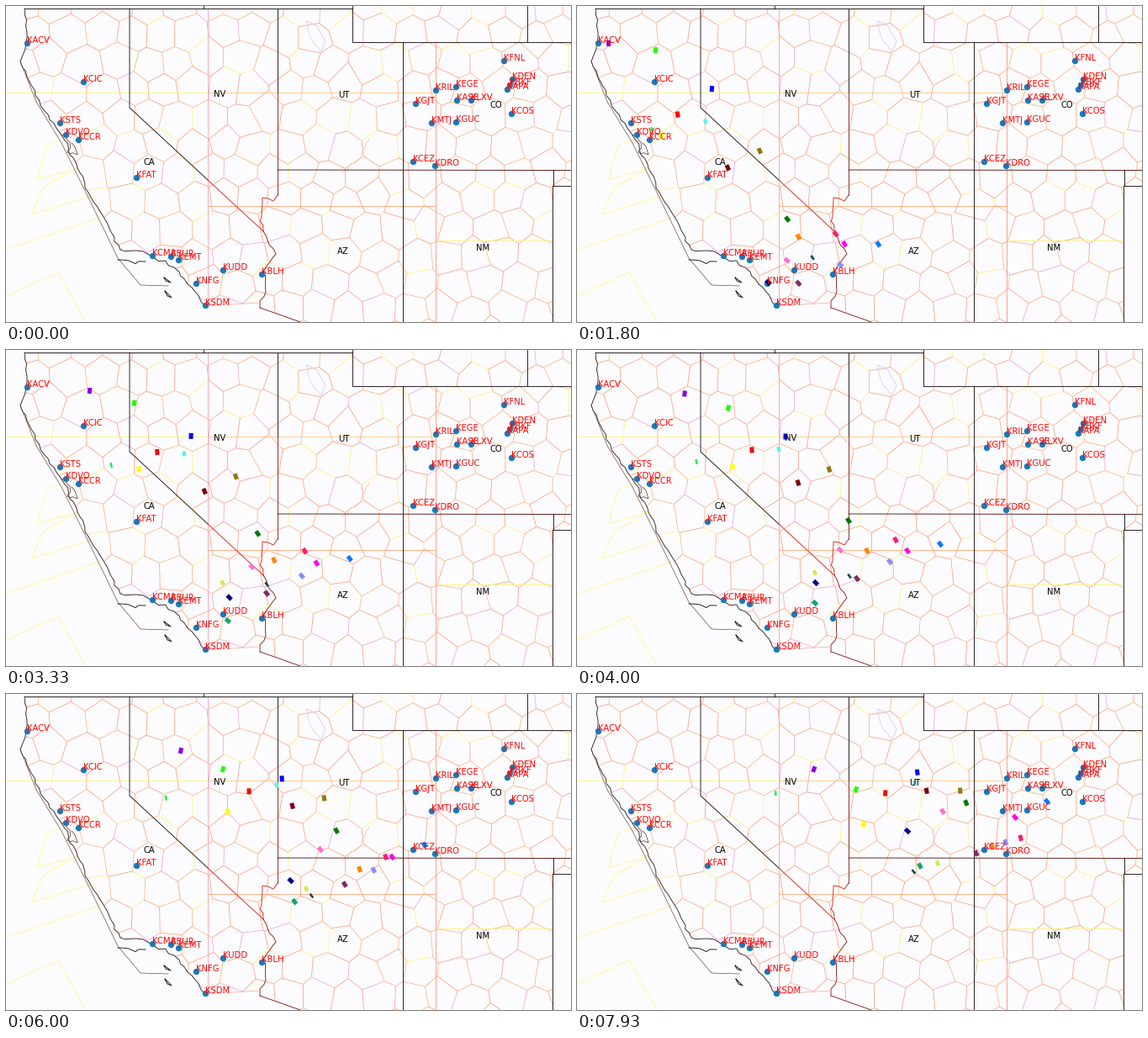
A matplotlib script for the animation above (8 s loop, 672 by 376 pixels).

```python
import matplotlib.pyplot as plt
import numpy as np
from matplotlib.animation import FuncAnimation
from matplotlib.collections import LineCollection
from matplotlib.patches import Polygon

W, H, DPI = 672, 376, 100
FRAMES, INTERVAL = 160, 50
PX = 72 / DPI
MIDWAY, LATE = 4.0, 7.93

fig = plt.figure(figsize=(W / DPI, H / DPI), dpi=DPI, facecolor="#fcfcfe")
ax = fig.add_axes([0, 0, 1, 1])
ax.set(xlim=(0, W), ylim=(H, 0))
ax.axis("off")
rng = np.random.default_rng(11)


def line(points, color="#181010", width=0.9):
    x, y = zip(*points)
    ax.plot(x, y, color=color, lw=width * PX, zorder=1.5)


def rugged(points, step=6, rough=1.1):
    """Subdivide a polyline and shake the new points a little."""
    out = [points[0]]
    for a, b in zip(np.array(points[:-1], float), np.array(points[1:], float)):
        n = max(1, int(np.hypot(*(b - a)) / step))
        out += [a + (b - a) * k / n + rng.normal(0, rough, 2) for k in range(1, n)]
        out.append(b)
    return out


def hex_sites(dx=37, dy=33, jitter=8):
    return np.array([(x + dx / 2 * (row % 2), y) + rng.uniform(-jitter, jitter, 2)
                     for row, y in enumerate(range(-dy, H + 2 * dy, dy))
                     for x in range(-dx, W + 2 * dx, dx)])


def voronoi_edges(sites, reach=85):
    edges = []
    for i, a in enumerate(sites):
        near = np.hypot(*(sites - a).T) < 2 * reach
        for j in range(i + 1, len(sites)):
            b = sites[j]
            if np.hypot(*(b - a)) > reach:
                continue
            keep = near.copy()
            keep[[i, j]] = False
            others = sites[keep] - a
            mid = (b - a) / 2
            along = np.array([-mid[1], mid[0]])
            slope = others @ along
            s = ((others**2).sum(1) / 2 - others @ mid) / slope
            lo, hi = max(s[slope < 0], default=-3), min(s[slope > 0], default=3)
            if lo < hi:
                edges.append([a + mid + lo * along, a + mid + hi * along])
    return edges


COAST = rugged([(22, 3), (25, 38), (17, 66), (28, 90), (46, 125), (70, 160), (85, 193),
                (104, 233), (122, 262), (136, 290), (155, 291), (175, 299), (200, 311),
                (225, 340), (237, 357)])
LAND = [*COAST, (302, 353), (304, 359), (350, 376), (650, 376), (650, 214),
        (672, 214), (672, 0), (412, 0), (412, 3)]

# Weather cells
edges = voronoi_edges(hex_sites())
tints = rng.choice(["#ff9a78", "#ffb07c", "#f0a0dc", "#fff07a"], len(edges),
                   p=[0.5, 0.3, 0.08, 0.12])
cells = LineCollection(edges, colors=tints, linewidths=0.75 * PX, zorder=1)
ax.add_collection(cells)
cells.set_clip_path(Polygon(LAND, transform=ax.transData))

# Tile seams
line([(0, 103), (240, 103)], "#fff27c")
line([(240, 103), (511, 103)], "#ffc78c")
line([(240, 238), (511, 238)], "#ffa878")
line([(511, 279), (650, 279)], "#fff07a")
line([(240, 3), (240, 357)], "#f8a4b0")
line([(511, 43), (511, 376)], "#ff9880")

# Offshore cells
line([(62, 160), (48, 167), (38, 206), (85, 193), (45, 215), (30, 248), (105, 225)],
     "#fff88a", 0.8)
line([(0, 290), (112, 252)], "#fff88a", 0.8)
line([(0, 345), (62, 317), (95, 376)], "#fff88a", 0.8)

# Lakes, coast and islands
line(rugged([(358, 18), (370, 24), (380, 42), (374, 54), (361, 35), (358, 18)]),
     "#d8ccf8", 0.8)
line(rugged([(432, 158), (422, 180), (400, 198)]), "#f8c0b8", 0.8)
line(COAST, "#302020")
line([(17, 66), (36, 114), (66, 163), (101, 234), (133, 300), (160, 332), (193, 333)],
     "#705040", 0.7)
line(rugged([(66, 153), (76, 162), (73, 174), (85, 177), (78, 163)], 4, 1.5), "#604838", 0.8)
line(rugged([(133, 302), (166, 304)]))
line([(188, 323), (196, 329), (190, 327), (188, 323)])
line([(189, 339), (197, 347), (192, 345), (189, 339)])

# State borders
DARK_RED, RED = "#802018", "#d82418"
line([(22, 3), (412, 3)])
line([(235, 0), (235, 3)])
line([(412, 0), (412, 43), (672, 43)])
line([(620, 0), (620, 43)])
line([(147, 3), (147, 121), (240, 207)])
line([(240, 207), (306, 268)], RED)
line([(323, 3), (323, 103)])
line([(323, 103), (323, 225)], DARK_RED)
line(rugged([(323, 225), (318, 232), (305, 228), (304, 250), (306, 268)]), RED)
line(rugged([(306, 268), (321, 295), (306, 316), (309, 340), (302, 359)]), DARK_RED)
line([(302, 359), (350, 376)], DARK_RED)
line([(237, 357), (302, 353)], "#f0b8a0", 0.8)
line([(323, 195), (672, 195.5)], "#501410")
line([(472, 43), (472, 376)])
line([(651, 195), (651, 214)])
line([(672, 214), (650, 214), (650, 376)])
line([(545, 375.5), (650, 375.5)])

AIRPORTS = {
    "KACV": (25, 44), "KCIC": (92, 90), "KSTS": (64, 139), "KDVO": (71, 153),
    "KCCR": (86, 159), "KFAT": (155, 204), "KCMA": (174, 297), "KBUR": (196, 298),
    "KEMT": (205, 302), "KUDD": (258, 314), "KNFG": (226, 330), "KBLH": (304, 319),
    "KSDM": (237, 356), "KCEZ": (484, 185), "KDRO": (510, 190), "KMTJ": (506, 139),
    "KGUC": (535, 138), "KGJT": (487, 116), "KRIL": (511, 100), "KEGE": (535, 96),
    "KASE": (536, 112), "KLXV": (553, 112), "KFNL": (592, 65), "KDEN": (602, 87),
    "KBKF": (599, 94), "KAPA": (596, 99), "KCOS": (601, 128),
}
STATES = {"CA": (163, 189), "NV": (247, 108), "UT": (395, 109), "CO": (576, 121),
          "AZ": (394, 295), "NM": (559, 291)}


def label(name, pos, color):
    ax.text(*pos, name, color=color, fontsize=10 * PX, family="DejaVu Sans",
            va="baseline", zorder=4)


for name, pos in AIRPORTS.items():
    ax.plot(*pos, "o", ms=7.4 * PX, mew=0, color="#1f77b4", zorder=2)
    label(name, pos, "red")
for name, pos in STATES.items():
    label(name, pos, "black")


class Plane:
    """Follows the smooth curve from its airport through two waypoints."""

    def __init__(self, origin, start, color, midway, late, size=(5, 7)):
        self.start = start
        x, y = zip(AIRPORTS[origin], midway, late)
        self.path = [np.poly1d(np.polyfit([start, MIDWAY, LATE], v, 2)) for v in (x, y)]
        self.shape = np.array([(-1, -1), (1, -1), (1, 1), (-1, 1)]) * size / 2
        self.patch = ax.add_patch(Polygon(self.shape, color=color, lw=0, zorder=3))

    def update(self, t):
        self.patch.set_visible(t >= self.start)
        vx, vy = (p.deriv()(t) for p in self.path)
        turn = np.array([(vx, vy), (-vy, vx)]) / np.hypot(vx, vy)
        self.patch.set_xy(self.shape @ turn + [p(t) for p in self.path])


SLIM, SMALL = np.array((2.6, 6)), np.array((4.2, 6))
planes = [
    Plane("KACV", 0.07, "#22ff00", (180, 69), (333, 114)),
    Plane("KCIC", 0.07, "#0a00ff", (248, 103), (406, 93)),
    Plane("KSTS", 0.40, "#ff0000", (208, 119), (368, 118)),
    Plane("KCCR", 0.07, "#55f5ee", (240, 118), (403, 106), SMALL),
    Plane("KFAT", 0.07, "#8f7a08", (300, 142), (457, 115)),
    Plane("KBUR", 0.07, "#057805", (323, 203), (464, 129)),
    Plane("KEMT", 0.20, "#ff8400", (345, 239), (495, 181)),
    Plane("KUDD", 0.07, "#ff1a70", (379, 226), (529, 171)),
    Plane("KUDD", 0.07, "#ff00f0", (393, 239), (522, 146)),
    Plane("KBLH", 0.20, "#0a78ff", (432, 231), (560, 127)),
    Plane("KSDM", 0.90, "#7c2c6c", (333, 272), (476, 189)),
    Plane("KUDD", 0.70, "#08484c", (324, 269), (401, 211), SLIM),
    Plane("KNFG", 0.93, "#ff70d0", (313, 238), (436, 139)),
    Plane("KACV", 1.50, "#8a00e8", (128, 52), (283, 90)),
    Plane("KCCR", 1.40, "#ffff00", (185, 139), (342, 155)),
    Plane("KDVO", 1.05, "#22f058", (142, 133), (237, 118), SLIM),
    Plane("KFAT", 1.15, "#780010", (263, 158), (417, 115)),
    Plane("KBLH", 1.40, "#8c8cff", (372, 252), (511, 176)),
    Plane("KEMT", 1.85, "#c8f040", (283, 265), (430, 201), SMALL),
    Plane("KNFG", 1.75, "#080080", (284, 277), (394, 162)),
    Plane("KSDM", 2.25, "#10a868", (283, 301), (409, 204)),
]


def draw(frame):
    for plane in planes:
        plane.update(frame * INTERVAL / 1000)
    return [plane.patch for plane in planes]


anim = FuncAnimation(fig, draw, frames=FRAMES, interval=INTERVAL, repeat=True,
                     repeat_delay=0, blit=False)
plt.show()
```
